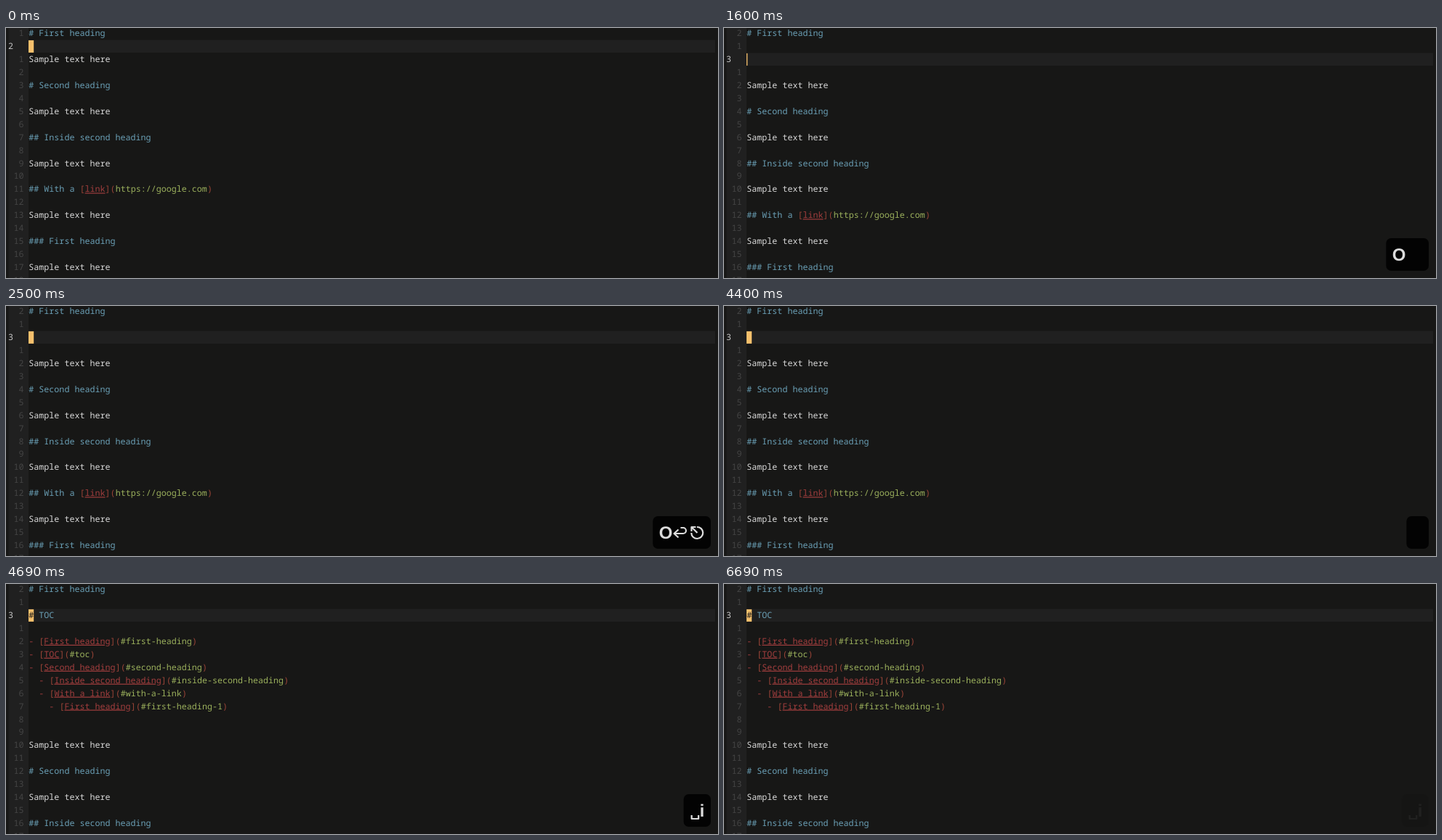
Animation, 980 px wide and 345 px high, one loop 8 s. Source, as an HTML page:

```html
<!DOCTYPE html>
<html lang="en">
<head>
<meta charset="utf-8">
<title>Table of contents in an editor</title>
<style>
  html, body { margin: 0; width: 100%; height: 100%; overflow: hidden; background: #171716; }
  svg { display: block; }
  text { white-space: pre; text-rendering: geometricPrecision; }
  .code { font: 11.7px "Noto Sans Mono", "DejaVu Sans Mono", monospace; }
  .link { text-decoration: underline 1px; text-underline-offset: 2px; text-decoration-skip-ink: none; }
  .keys text { font: bold 24px "Liberation Sans", Arial, sans-serif; fill: #dcdcdc; }
  .keys path { fill: none; stroke: #dcdcdc; stroke-width: 2.2; stroke-linejoin: round; }
</style>
</head>
<body>
<svg id="stage" width="980" height="345" viewBox="0 0 980 345"></svg>
<script>
const LOOP = 8000;
const LEFT = 31.3, CHAR = 7.02, ROW = 17.95, BASE = 11;
const COLOR = {
  back: '#171716', gutter: '#202020', number: '#444444', current: '#c4c4c4',
  text: '#d8d8d8', heading: '#6a9fb5', link: '#a23e3e', bracket: '#9c4538',
  url: '#9bb05c', cursor: '#f7c06c'
};

const stage = document.getElementById('stage');
const sample = 'Sample text here';
const title = '# First heading';
const rest = [
  sample, '', '# Second heading', '', sample, '',
  '## Inside second heading', '', sample, '',
  '## With a [link](https://google.com)', '', sample, '',
  '### First heading', '', sample, '', ''
];
const contents = [
  '# TOC', '',
  '- [First heading](#first-heading)',
  '- [TOC](#toc)',
  '- [Second heading](#second-heading)',
  '  - [Inside second heading](#inside-second-heading)',
  '  - [With a link](#with-a-link)',
  '    - [First heading](#first-heading-1)',
  '', ''
];
const DOCS = {
  start: { lines: [title, '', ...rest], row: 1 },
  opened: { lines: [title, '', '', ...rest], row: 1 },
  entered: { lines: [title, '', '', '', ...rest], row: 2 },
  toc: { lines: [title, '', ...contents, ...rest], row: 2 }
};

// Key overlay symbols: advance width and drawing at a given x
const SYMBOLS = {
  O: [18.7, x => keyText(x, 'O')],
  i: [6.7, x => keyText(x, 'i')],
  space: [13.6, x => stroke(x, 'M2.5 319V324H12V319')],
  enter: [23, x => stroke(x, 'M11 306H14.5A4 4 0 0 1 14.5 314H2M8 308.5L2 314L8 319.5')],
  escape: [21, x => stroke(x, 'M10.5 305A8 8 0 1 1 2.8 313M11 313L3 305M3 311V305H9')]
};

// [start, document, block cursor, typed keys, overlay opacity, visible keys]
const STEPS = [
  [0, 'start', true, [], 0],
  [1400, 'opened', false, ['O'], .55],
  [1500, 'opened', false, ['O'], 1],
  [1600, 'entered', false, ['O', 'enter'], 1, 1],
  [1700, 'entered', false, ['O', 'enter'], 1],
  [2400, 'entered', true, ['O', 'enter', 'escape'], 1, 2],
  [2500, 'entered', true, ['O', 'enter', 'escape'], 1],
  [4400, 'entered', true, ['space'], 1, 0],
  [4500, 'entered', true, ['space'], 1],
  [4600, 'entered', true, ['space', 'i'], 1],
  [4690, 'toc', true, ['space', 'i'], 1],
  [6490, 'toc', true, ['space', 'i'], .7],
  [6590, 'toc', true, ['space', 'i'], .35],
  [6690, 'toc', true, ['space', 'i'], .05]
];

const rect = (x, y, w, h, fill, extra = '') =>
  `<rect x="${x}" y="${y}" width="${w}" height="${h}" fill="${fill}" ${extra}/>`;
const code = (x, y, fill, str, extra = 'class="code"') =>
  `<text x="${x}" y="${y}" fill="${fill}" ${extra}>${str}</text>`;
const keyText = (x, str) => `<text x="${x}" y="321">${str}</text>`;
const stroke = (x, d) => `<path transform="translate(${x} 0)" d="${d}"/>`;

function tokens(line) {
  const parts = line.match(/^(.*?)\[(.+)\]\((.+)\)$/);
  const lead = parts ? parts[1] : line;
  const leadColor = /^#/.test(line) ? COLOR.heading : parts ? COLOR.link : COLOR.text;
  const list = [[lead, leadColor]];
  if (parts) {
    list.push(['[', COLOR.bracket], [parts[2], COLOR.link, 'class="code link"'],
      [']', COLOR.bracket], ['(', COLOR.bracket], [parts[3], COLOR.url], [')', COLOR.bracket]);
  }
  return list;
}

function drawLine(line, y) {
  let col = 0, out = '';
  for (const [str, color, extra] of tokens(line)) {
    if (str) out += code(LEFT + col * CHAR, y, color, str, extra);
    col += str.length;
  }
  return out;
}

function drawEditor({ lines, row }, block) {
  const top = row * ROW - 1.4;
  let out = rect(0, 0, 980, 345, COLOR.back)
    + rect(3.5, 0, 27.5, 345, COLOR.gutter)
    + rect(3.5, top, 972.5, 17.5, COLOR.gutter);
  lines.slice(0, 20).forEach((line, i) => {
    const y = BASE + i * ROW;
    out += i === row
      ? code(3, y, COLOR.current, row + 1)
      : code(24.5, y, COLOR.number, Math.abs(i - row), 'class="code" text-anchor="end"');
    out += drawLine(line, y);
  });
  out += rect(31, top + .4, block ? 7.2 : 1.3, 17, COLOR.cursor);
  if (block && lines[row]) out += code(LEFT, BASE + row * ROW, COLOR.back, lines[row][0]);
  return out;
}

function drawKeys(keys, opacity, visible = keys.length) {
  if (!keys.length) return '';
  const width = keys.reduce((sum, key) => sum + SYMBOLS[key][0], 0);
  let x = 961.5 - width;
  let out = rect(x - 8.5, 290, width + 17, 45, '#030303', 'rx="7"');
  keys.forEach((key, i) => {
    const [advance, draw] = SYMBOLS[key];
    if (i < visible) out += draw(x);
    x += advance;
  });
  return `<g class="keys" opacity="${opacity}">${out}</g>`;
}

let shown;
function render(time) {
  const step = STEPS.findLast(([start]) => start <= time);
  if (step === shown) return;
  shown = step;
  const [, doc, block, keys, opacity, visible] = step;
  stage.innerHTML = drawEditor(DOCS[doc], block) + drawKeys(keys, opacity, visible);
}

const begin = performance.now();
function tick() {
  render((performance.now() - begin) % LOOP);
  requestAnimationFrame(tick);
}
tick();
</script>
</body>
</html>
```
